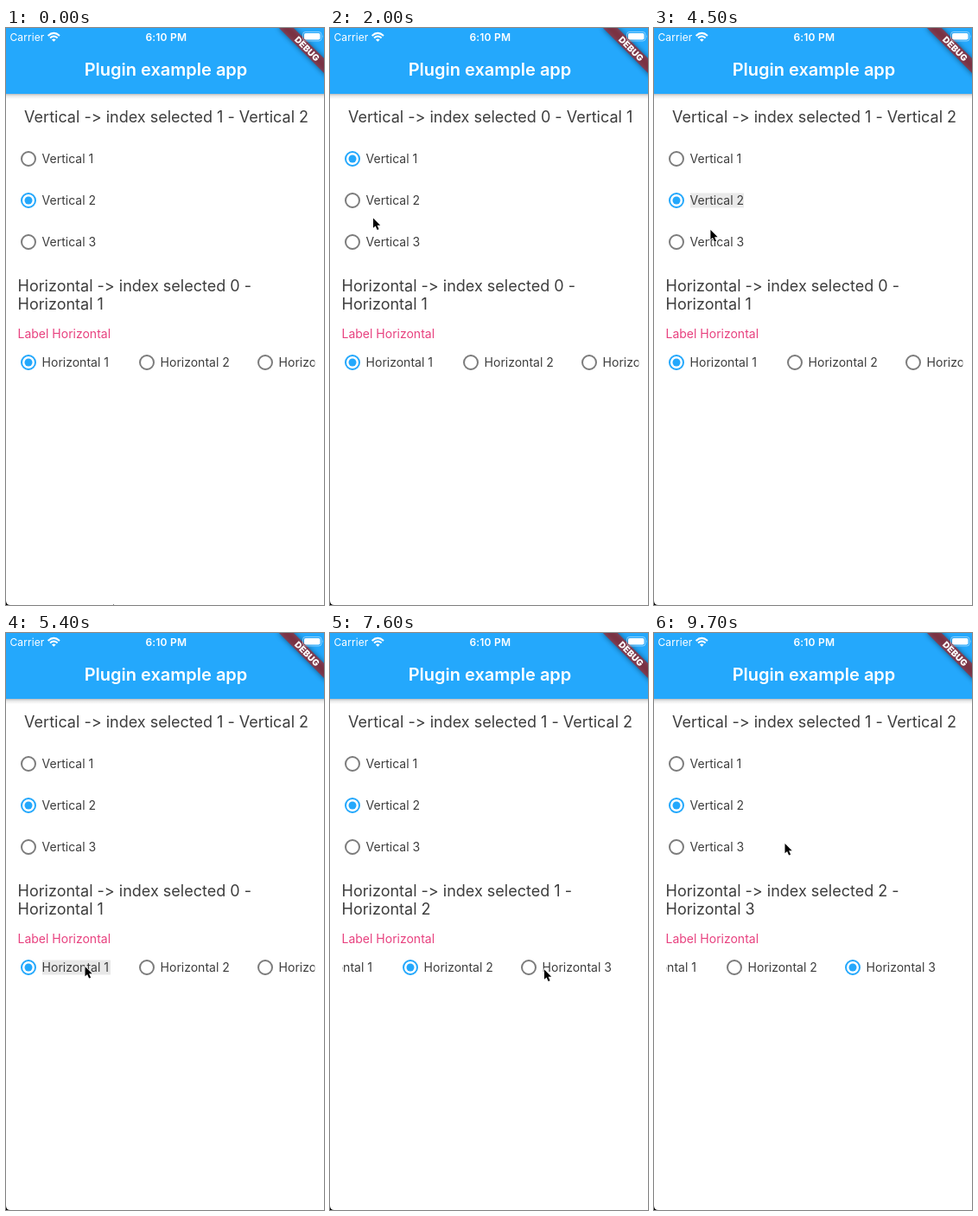
An HTML page that plays this animation: 368 px wide and 666 px high, repeating every 10 s.

```html
<!DOCTYPE html>
<html lang="en">
<head>
<meta charset="utf-8">
<title>Radio groups</title>
<style>
  html, body { margin: 0; width: 100%; height: 100%; overflow: hidden; background: #fff; }
  svg { display: block; width: 368px; height: 666px; }
  text {
    font-family: Inter, Roboto, "Open Sans", sans-serif;
    font-optical-sizing: none;
    font-feature-settings: "calt" 0, "liga" 0;
    fill: #3d3d3d;
  }
  .small { font-size: 14px; }
  .heading { font-size: 18px; }
  .bar { fill: #fff; }
  .middle { text-anchor: middle; }
</style>
</head>
<body>
<svg viewBox="0 0 368 666">
  <defs>
    <clipPath id="rowClip"><rect x="14" y="360" width="343.3" height="52"/></clipPath>
    <filter id="soft" x="-20%" y="-60%" width="140%" height="220%"><feGaussianBlur stdDeviation="3"/></filter>
    <linearGradient id="shade" x2="0" y2="1">
      <stop stop-color="#000" stop-opacity=".26"/>
      <stop offset=".4" stop-color="#000" stop-opacity=".09"/>
      <stop offset="1" stop-color="#000" stop-opacity="0"/>
    </linearGradient>
  </defs>
  <rect width="368" height="666" fill="#fff"/>
  <rect y="76" width="368" height="6" fill="url(#shade)"/>
  <rect width="368" height="76" fill="#24a8fc"/>
  <text class="bar middle" x="185" y="55" font-size="20" font-weight="600">Plugin example app</text>

  <text id="vTitle" class="heading middle" x="185.6" y="109"></text>
  <g id="vertical"></g>
  <text id="hTitle1" class="heading" x="13.5" y="304"></text>
  <text id="hTitle2" class="heading" x="13.5" y="325"></text>
  <text class="small" x="13.5" y="358" style="fill:#e8417f">Label Horizontal</text>
  <g clip-path="url(#rowClip)"><g id="horizontal"></g></g>

  <g transform="translate(372.5 0) rotate(45)">
    <rect x="-40" y="28" width="80" height="12" opacity=".5" filter="url(#soft)"/>
    <rect x="-40" y="28" width="80" height="12" fill="#b71c1c" fill-opacity=".627"/>
    <text class="bar middle" y="37.7" font-size="10.2" font-weight="900">DEBUG</text>
  </g>

  <text class="bar" x="4.5" y="14.6" font-size="12" letter-spacing=".1">Carrier</text>
  <g fill="none" stroke="#fff" stroke-width="2">
    <path d="M48.6 8.9Q55.3 2.9 62 8.9M51 11.4Q55.3 7.5 59.6 11.4"/>
    <path d="M55.3 15.8L53 13.4Q55.3 11.6 57.6 13.4Z" fill="#fff" stroke="none"/>
  </g>
  <text class="bar middle" x="185.3" y="14.6" font-size="12" font-weight="600" letter-spacing=".2">6:10 PM</text>
  <rect x="343.5" y="4.5" width="21.5" height="10.5" rx="3" fill="none" stroke="#fff" stroke-opacity=".45"/>
  <rect x="345" y="6" width="18.5" height="7.5" rx="1.8" fill="#fff"/>
  <path d="M366.3 8q1.3 1.7 0 3.5z" fill="#fff" fill-opacity=".5"/>
  <path d="M0 661Q0 666 5 666H0Z"/>

  <g id="cursor">
    <path d="M1 1V12.3L3.6 10L5.6 14.6L7.6 13.7L5.6 9.3H9.2Z" stroke="#fff" stroke-width="1.2" paint-order="stroke"/>
  </g>
</svg>
<script>
const LOOP = 10000, STEP = 100;
const BLUE = [36, 168, 252], GREY = [124, 124, 124];
const PICK_DELAY = 150, TOGGLE = 200;
const SCROLL_END = 70, DRAG_START = 6800, DRAG_END = 7600;

const byId = id => document.getElementById(id);
const clamp = v => Math.max(0, Math.min(1, v));
const mix = (a, b, p) => a + (b - a) * p;
const ease = p => p * p * (3 - 2 * p);
const progress = (t, start, end) => clamp((t - start) / (end - start));

function add(parent, tag, attrs, text = "") {
  const node = document.createElementNS("http://www.w3.org/2000/svg", tag);
  for (const key in attrs) node.setAttribute(key, attrs[key]);
  node.textContent = text;
  return parent.appendChild(node);
}

function makeOption(parent, label, x, y, width) {
  return {
    x: x + 16, y, width,
    glow: add(parent, "rect", { x: x + 16, y: y - 8.5, width, height: 17 }),
    ring: add(parent, "circle", { cx: x, cy: y, r: 8, fill: "none", "stroke-width": 2 }),
    dot: add(parent, "circle", { cx: x, cy: y, fill: `rgb(${BLUE})` }),
    text: add(parent, "text", { class: "small", x: x + 15.6, y: y + 4.7 }, label)
  };
}

function makeGroup(id, name, width, selected, place) {
  const options = [0, 1, 2].map(i => makeOption(byId(id), `${name} ${i + 1}`, ...place(i), width));
  return { options, picks: [{ at: -LOOP, index: selected }], taps: [] };
}

const vertical = makeGroup("vertical", "Vertical", 62, 1, i => [26, 151 + 48 * i]);
const horizontal = makeGroup("horizontal", "Horizontal", 79, 0, i => [26 + 137 * i, 386]);

const glides = [];
let pointer = [123, 664];

function glide(start, end, to, dip = 0) {
  glides.push({ start, end, from: pointer, to, dip });
  pointer = to;
}

function tap(at, group, index) {
  group.taps.push({ at, index });
  if (group.picks[group.picks.length - 1].index !== index) group.picks.push({ at: at + PICK_DELAY, index });
}

// a point on an option's label, at a fraction of its width
function on(group, index, fraction = .33) {
  const { x, y, width } = group.options[index];
  return [x + width * fraction, y + 1];
}

glide(0, 200, [72, 266]);
glide(400, 1000, on(vertical, 0, .15));
tap(1140, vertical, 0);
glide(1400, 2000, [49, 218.5]);
glide(2200, 3200, on(vertical, 1), 30);
glide(3300, 3600, on(vertical, 2));
tap(3760, vertical, 2);
glide(4000, 4200, on(vertical, 1));
tap(4220, vertical, 1);
glide(4400, 4800, [75, 405]);
glide(4800, 5100, [90.5, 384]);
tap(5310, horizontal, 0);
glide(5400, 5700, on(horizontal, 1, .42));
tap(5940, horizontal, 1);
glide(6100, 6600, [327, 384.5], 6);
glide(DRAG_START, DRAG_END, [247, 387.5], 22);
tap(7940, horizontal, 2);
glide(8500, 8800, [180, 385]);
glide(8900, 9700, [150.5, 242]);

function pointerAt(t) {
  const { start, end, from, to, dip } = glides.filter(g => g.start <= t).pop();
  const p = ease(progress(t, start, end));
  return [mix(from[0], to[0], p), mix(from[1], to[1], p) + dip * Math.sin(Math.PI * p)];
}

const glowAt = age => age < 0 ? 0 : Math.min(.1, age / 1000, Math.max(0, (480 - age) / 2400));

function updateGroup({ options, picks, taps }, t) {
  const [current, previous] = picks.filter(p => p.at <= t).reverse();
  const p = progress(t, current.at - STEP, current.at + TOGGLE - STEP);
  options.forEach((option, i) => {
    const level = i === current.index ? p : previous && i === previous.index ? 1 - p : 0;
    const glow = taps.reduce((sum, { at, index }) => sum + (index === i ? glowAt(t - at) : 0), 0);
    option.ring.setAttribute("stroke", `rgb(${GREY.map((g, j) => Math.round(mix(g, BLUE[j], level)))})`);
    option.dot.setAttribute("r", 4.5 * level);
    option.glow.setAttribute("fill-opacity", glow);
  });
  return current.index;
}

function draw(t) {
  const v = updateGroup(vertical, t);
  const h = updateGroup(horizontal, t);
  const scroll = SCROLL_END * ease(progress(t, DRAG_START, DRAG_END));
  byId("vTitle").textContent = `Vertical -> index selected ${v} - Vertical ${v + 1}`;
  byId("hTitle1").textContent = `Horizontal -> index selected ${h} -`;
  byId("hTitle2").textContent = `Horizontal ${h + 1}`;
  byId("horizontal").setAttribute("transform", `translate(${-scroll} 0)`);
  byId("cursor").setAttribute("transform", `translate(${pointerAt(t)})`);
}

const start = performance.now();
function tick() {
  const t = (performance.now() - start) % LOOP;
  draw(Math.floor(t / STEP) * STEP);
  requestAnimationFrame(tick);
}
tick();
</script>
</body>
</html>
```
